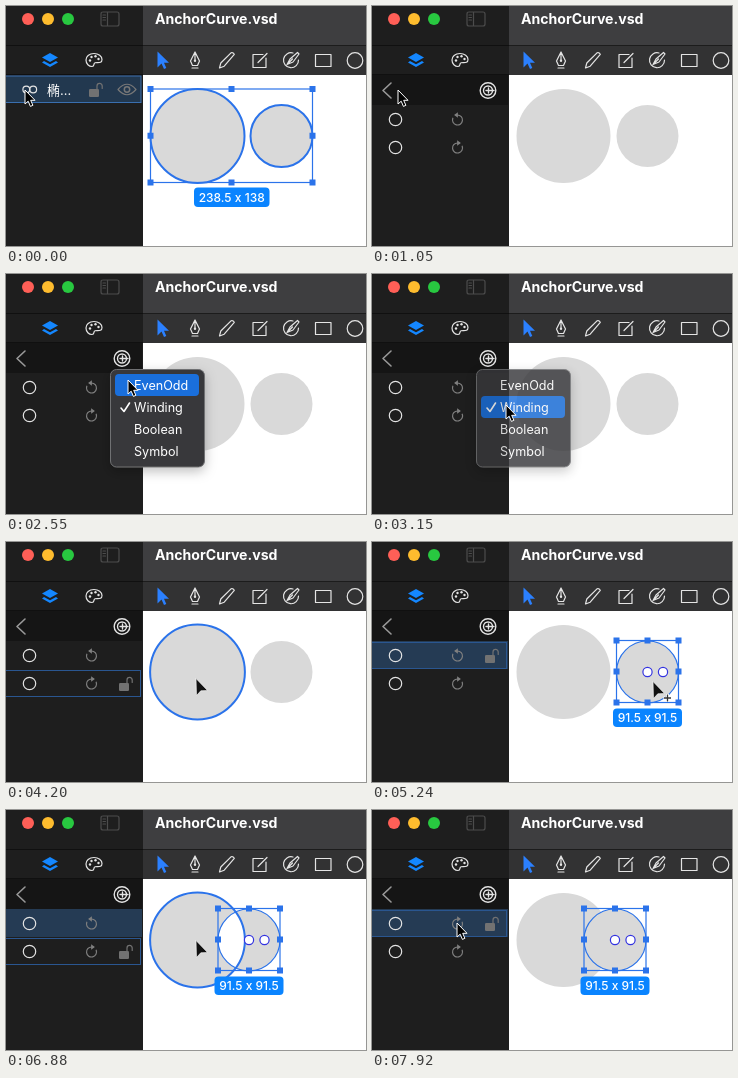
Recreate the animation shown at these times as an HTML page. Size 360 by 240 pixels, loop 8000 ms.

```html
<!DOCTYPE html>
<html lang="en">
<head>
<meta charset="utf-8">
<title>Winding rule</title>
<style>
  html, body { margin: 0; width: 100%; height: 100%; overflow: hidden; background: #fff; }
  svg { display: block; width: 360px; height: 240px; }
  text { font-family: Inter, "Noto Sans CJK SC", "Noto Sans CJK", sans-serif; fill: #fff; white-space: pre; }
  .line { fill: none; stroke: #e4e4e4; stroke-width: 1.2; stroke-linecap: round; stroke-linejoin: round; }
  .dim { stroke: #808080; }
  .sel { fill: none; stroke: #2b73ea; stroke-width: 1.2; }
  .hover { fill: none; stroke: #2b73ea; stroke-width: 2; }
  .tag { fill: #0a84ff; }
  .size { font-size: 12px; font-weight: 500; text-anchor: middle; }
  .menu text { font-size: 12.6px; }
  .delta text { font-size: 10.5px; font-weight: 500; }
</style>
</head>
<body>
<svg viewBox="0 0 360 240">
  <defs>
    <g id="lock">
      <rect x="-7" y="-1" width="10" height="8" rx="1.2" fill="#727272"/>
      <path class="line" style="stroke:#727272" d="M1-1V-4A2.6 2.6 0 0 1 6.2-4V-1.5"/>
    </g>
    <g id="turn">
      <path class="line dim" d="M-4.7-1.8A5 5 0 1 0 0-5H-2"/>
      <path d="M-3.4-5L.4-7.8V-2.2Z" fill="#808080"/>
    </g>
    <filter id="shadow" x="-30%" y="-30%" width="160%" height="160%">
      <feDropShadow dx="0" dy="4" stdDeviation="6" flood-opacity=".25"/>
    </filter>
  </defs>

  <!-- canvas -->
  <rect width="360" height="240" fill="#fff"/>
  <path id="shapes" fill="#d9d9d9"/>
  <circle id="hover" class="hover"/>
  <g id="groupSel">
    <circle class="hover" cx="191.5" cy="130" r="47"/>
    <circle class="hover" cx="275.5" cy="130" r="31"/>
    <g id="groupBox"></g>
    <rect class="tag" x="188" y="181.5" width="75.5" height="19.5" rx="4"/>
    <text class="size" x="225.7" y="195.7">238.5 x 138</text>
  </g>
  <g id="dotSel">
    <circle class="sel" cx="275.5" cy="130" r="31"/>
    <g id="dotBox"></g>
    <g fill="#fff" stroke="#3333e0" stroke-width="1.2">
      <circle cx="275.5" cy="130" r="4.6"/><circle cx="291" cy="130" r="4.6"/>
    </g>
    <rect class="tag" x="241" y="166.5" width="69" height="18.5" rx="4"/>
    <text class="size" x="275.5" y="180.2">91.5 x 91.5</text>
  </g>
  <path id="guide" fill="none" stroke="#e0745a"/>
  <g id="delta" class="delta">
    <rect class="tag" width="71" height="34" rx="4"/>
    <path class="line" style="stroke-width:1" d="M5.5 6V13M15 9.5H7.5M10 7L7.5 9.5L10 12M6 28.5H14M10 19.5V26.5M7.5 24L10 26.5L12.5 24"/>
    <text x="16" y="14.3">:</text><text x="16" y="28.3">:</text>
    <text id="dx" x="66" y="14.3" text-anchor="end"></text>
    <text x="66" y="28.3" text-anchor="end">0 Pixel</text>
  </g>

  <!-- window chrome -->
  <rect x="137" width="223" height="40" fill="#3e3e40"/>
  <rect x="137" y="40" width="223" height="29" fill="#323233"/>
  <rect x="137" y="39" width="223" height="1" fill="#1c1c1c"/>
  <rect width="137" height="240" fill="#1e1e1e"/>
  <path d="M0 39.5H137M0 68.5H137" stroke="#101010"/>
  <circle cx="22" cy="13" r="6" fill="#ff5f57"/>
  <circle cx="42" cy="13" r="6" fill="#febc2e"/>
  <circle cx="62" cy="13" r="6" fill="#28c840"/>
  <path class="line" style="stroke:#4c4c4c" d="M97 6H111Q113 6 113 8V18Q113 20 111 20H97Q95 20 95 18V8Q95 6 97 6ZM101.5 6V20M97 9H99.5M97 11.5H99.5M97 14H99.5"/>
  <text x="149" y="18" font-size="14.1" font-weight="700">AnchorCurve.vsd</text>
  <g fill="#1487ff">
    <path d="M44 47L52 51.5L44 56L36 51.5Z"/>
    <path d="M38 55L44 58.3L50 55L52 56.5L44 61L36 56.5Z"/>
  </g>
  <path class="line" d="M88 47.5C83 47.5 80 50.5 80 54C80 58 83 60.5 86 60.5C89 60.5 87 57.5 89 56.8C91 56 96 58 96 53.5C96 50 92.5 47.5 88 47.5Z"/>
  <g fill="#e4e4e4">
    <circle cx="84" cy="54.5" r="1.2"/><circle cx="85.5" cy="51" r="1.2"/>
    <circle cx="89.5" cy="50.3" r="1.2"/><circle cx="92.5" cy="53" r="1.2"/>
  </g>
  <path d="M151.5 45.5V61.5L155.5 57.5L158 63L160.3 62L158 56.7H163Z" fill="#2b80ff"/>
  <path class="line" d="M189 46L184.5 55L186.5 59.5H191.5L193.5 55ZM189 46V54M186 62H192"/>
  <circle cx="189" cy="54.8" r="1.2" fill="#e4e4e4"/>
  <path class="line" d="M213.5 62L214.8 57L225 46.8Q227 46 228.3 48.3L218.2 60.2Z"/>
  <path class="line" d="M257 48.5H247V61.5H260V52M252 56.5L261 47.5"/>
  <path class="line" d="M287 47A7.5 7.5 0 1 0 292.5 54M281 58.5L284 53L291.5 46.5L293 48L287 56ZM281 58.5L286.5 53"/>
  <rect class="line" x="309.5" y="48.5" width="15.5" height="12"/>
  <circle class="line" cx="349" cy="54.5" r="7.8"/>

  <!-- layer list -->
  <g id="rootList">
    <rect x="-1" y="70" width="136" height="26.5" fill="#22384f" stroke="#3a6faf"/>
    <g class="line"><circle cx="20.3" cy="83.5" r="3.4"/><circle cx="27.2" cy="83.5" r="3.4"/></g>
    <text x="41" y="88.5" font-size="13">椭...</text>
    <use href="#lock" x="90" y="84"/>
    <path class="line" style="stroke:#777" d="M112 83.5Q121 73 130 83.5Q121 94 112 83.5Z"/>
    <circle cx="121" cy="83.5" r="2.7" fill="none" stroke="#777" stroke-width="1.5"/>
  </g>
  <g id="pathList">
    <rect y="69" width="136" height="30" fill="#151515"/>
    <path class="line" style="stroke:#999;stroke-width:1.6" d="M19 77L11 84.5L19 92"/>
    <rect id="press" x="104" y="72" width="24" height="24.5" rx="4" fill="#555"/>
    <g class="line" style="stroke-width:1.4">
      <circle cx="116" cy="84.5" r="7.8"/><circle cx="116" cy="84.5" r="4.5"/>
      <path d="M114 84.5H122M116.5 82V87"/>
    </g>
    <rect id="rowFill" y="99" width="136" height="28" fill="#253b54"/>
    <g id="rowHover">
      <rect x="-1" y="100.5" width="135.5" height="26" fill="none" stroke="#2a5690"/>
      <use href="#lock" x="120" y="114"/>
    </g>
    <circle class="line" cx="23.5" cy="113.5" r="6.2"/>
    <circle class="line" cx="23.5" cy="141.5" r="6.2"/>
    <use id="turn1" href="#turn"/>
    <use href="#turn" transform="translate(85.5 142) scale(-1 1)"/>
  </g>

  <g id="menu" class="menu">
    <rect x="104.5" y="95.5" width="94" height="97.5" rx="6" fill="#37383a" stroke="#707173" filter="url(#shadow)"/>
    <rect id="pick" x="109" width="84" height="22" rx="4" fill="#1a6fdc"/>
    <path class="line" style="stroke:#fff;stroke-width:1.6" d="M115 134L118 137.5L123.5 129"/>
    <text x="128" y="115.8">EvenOdd</text><text x="128" y="137.8">Winding</text>
    <text x="128" y="159.8">Boolean</text><text x="128" y="181.8">Symbol</text>
  </g>

  <g id="cursor" stroke="#fff" stroke-linejoin="round">
    <path id="pointer" d="M0 0V14L3.2 11.2L5.4 16.4L7.9 15.3L5.7 10.3H10Z" fill="#000"/>
    <path id="arrow" d="M0 .5L.5 17.5L4.8 12.8L11.5 12.5Z" fill="#111" stroke-width=".6"/>
    <g id="plus" fill="none">
      <path d="M10.5 17H18.5M14.5 13V21" stroke-width="3"/>
      <path d="M11 17H18M14.5 13.5V20.5" stroke="#333" stroke-width="1.3"/>
    </g>
  </g>
</svg>
<script>
const LOOP = 8000;
const $ = id => document.getElementById(id);
const set = (id, attrs) => { for (const k in attrs) $(id).setAttribute(k, attrs[k]); };
const show = (id, on) => { $(id).style.display = on ? "" : "none"; };
const move = (id, x, y) => set(id, { transform: `translate(${x} ${y})` });

const BIG = { x: 191.5, y: 130, r: 47 };
const SMALL = { x: 275.5, y: 130, r: 31 };

const PATH = [
  [0, 19, 84], [150, 18, 84], [300, 19, 84],
  [1050, 26, 84], [1200, 46, 84], [1350, 73, 84], [1500, 96, 83], [1650, 109, 83], [1800, 113, 83],
  [2400, 116, 91], [2550, 122, 106], [2700, 130, 123], [2850, 134, 131],
  [3900, 141, 133], [4050, 163, 136], [4200, 190, 136], [4340, 225, 135], [4490, 262, 137], [4640, 281, 139],
  [5540, 277, 139], [5690, 267, 139], [5840, 257, 140], [5990, 251, 140], [6140, 249, 140],
  [6730, 236, 138], [6880, 190, 130], [7030, 134, 120], [7180, 98, 115], [7330, 85, 113]
];

const at = t => PATH.filter(p => p[0] <= t).pop();
const ring = ({ x, y, r }) => `M${x - r} ${y}a${r} ${r} 0 1 1 ${2 * r} 0a${r} ${r} 0 1 1 ${-2 * r} 0Z`;
const inside = (c, x, y) => Math.hypot(x - c.x, y - c.y) < c.r;
const cross = x => `M${x - 3} 127L${x + 3} 133M${x - 3} 133L${x + 3} 127`;

function handles(id, x, y, w, h) {
  let s = `<rect class="sel" x="${x}" y="${y}" width="${w}" height="${h}"/>`;
  for (let i = 0; i < 9; i++) {
    if (i === 4) continue;
    const hx = x + w * (i % 3) / 2 - 3, hy = y + h * Math.floor(i / 3) / 2 - 3;
    s += `<rect x="${hx}" y="${hy}" width="6" height="6" fill="#2b73ea"/>`;
  }
  $(id).innerHTML = s;
}

function hovered(t, small, x, y) {
  if (t < 3900 || (t >= 5540 && t < 6580)) return 0;
  if (x < 137) return t > 6580 && y < 127 ? 1 : 0;
  return inside(small, x, y) ? 1 : inside(BIG, x, y) ? 2 : 0;
}

function draw(t) {
  const [, x, y] = at(t);
  const between = (a, b) => t >= a && t < b;
  const drag = between(5540, 6580);
  const selected = t >= 4940;
  const flipped = t >= 7770;
  const shift = t < 5540 ? 0 : drag ? x - 281 : -32;
  const small = { ...SMALL, x: SMALL.x + shift - (t >= 6140 ? .5 : 0) };
  const over = hovered(t, small, x, y);

  set("shapes", { d: ring(BIG) + ring(small), "fill-rule": flipped ? "nonzero" : "evenodd" });
  const outline = over === 2 || (over === 1 && !selected);
  show("hover", outline);
  if (outline) {
    const c = over === 2 ? BIG : small;
    set("hover", { cx: c.x, cy: c.y, r: c.r + .4 });
  }

  show("groupSel", t < 900);
  show("dotSel", selected && !drag);
  move("dotSel", small.x - SMALL.x, 0);

  show("guide", drag);
  show("delta", drag);
  if (drag) {
    set("guide", { d: `M144.5 129.5H${small.x}` + [144.5, 238.5, small.x].map(cross).join("") });
    move("delta", x + 21, y - 53);
    $("dx").textContent = `${Math.round(shift * 1.5)} Pixel`;
  }

  show("rootList", t < 900);
  show("pathList", t >= 900);
  show("press", between(1950, 2100));
  show("rowFill", selected);
  show("rowHover", over);
  move("rowHover", 0, over === 2 ? 28 : 0);
  set("turn1", { transform: `translate(85.5 114) scale(${flipped ? -1 : 1} 1)` });

  show("menu", between(2100, 3450));
  $("menu").style.opacity = t < 3150 ? 1 : t < 3300 ? .82 : .3;
  show("pick", t >= 2550);
  set("pick", { y: t < 2700 ? 100 : 122 });

  const canvas = x > 137;
  move("cursor", x, y);
  show("pointer", !canvas);
  show("arrow", canvas);
  show("plus", canvas && selected && inside(small, x, y));
}

handles("groupBox", 144.5, 83, 162, 93.5);
handles("dotBox", 244.5, 98.5, 62, 62);

(function tick() {
  draw(performance.now() % LOOP);
  requestAnimationFrame(tick);
})();
</script>
</body>
</html>
```
